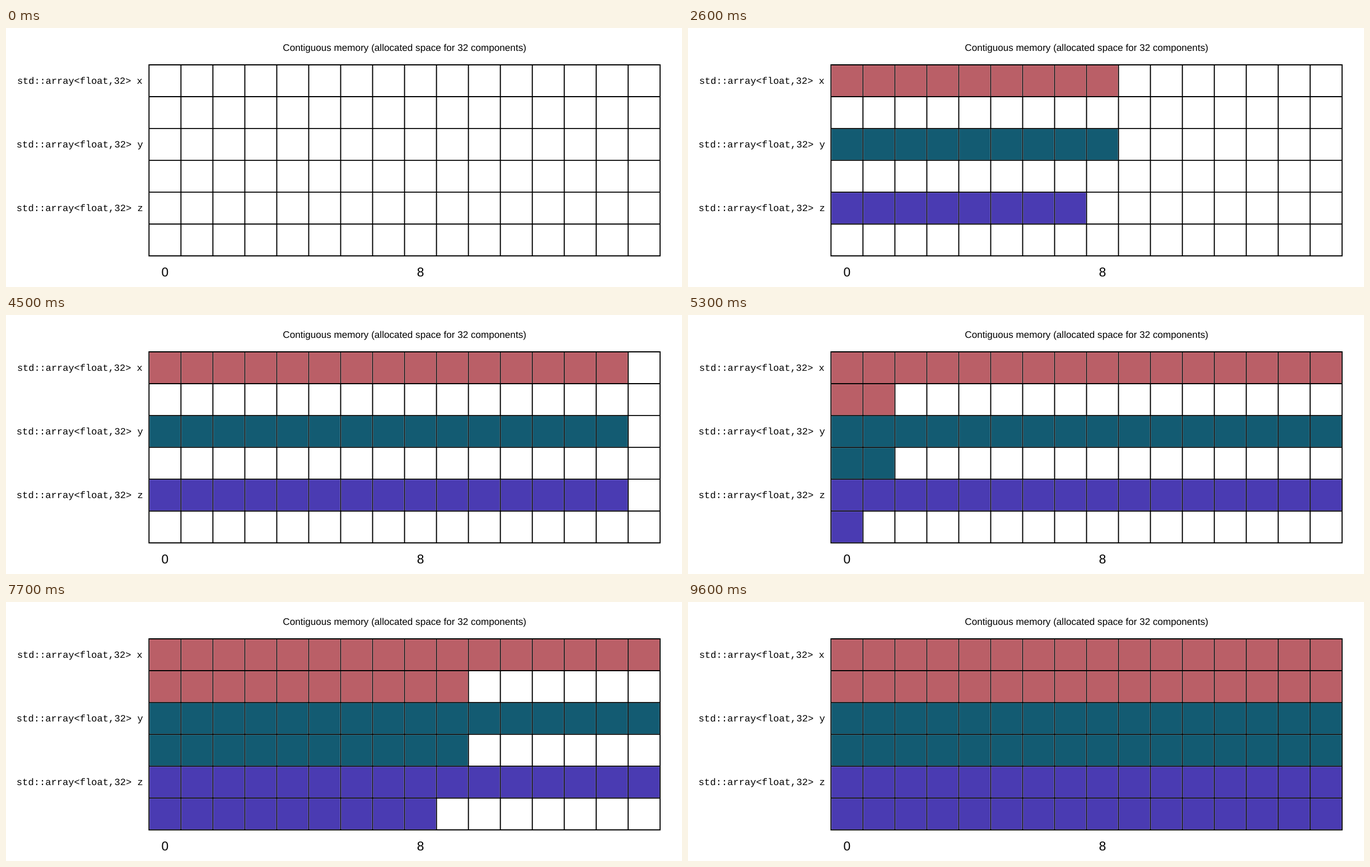
Animation, 1207 px wide and 464 px high, one loop 9700 ms. Source, as an HTML page:

```html
<!DOCTYPE html>
<html lang="en">
<head>
<meta charset="utf-8">
<title>Contiguous memory</title>
<style>
  html, body { margin: 0; width: 100%; height: 100%; overflow: hidden; background: #fff; }
  svg { display: block; width: 1207px; height: 464px; }
  text { text-anchor: middle; text-rendering: geometricPrecision; font-family: "Liberation Sans", Arial, sans-serif; }
  .code { font-family: "Liberation Mono", "Courier New", monospace; }
</style>
</head>
<body>
<svg viewBox="0 0 1207 464" xmlns="http://www.w3.org/2000/svg"></svg>
<script>
const STEP = 100, COLS = 16, ROWS = 6, SIZE = 57.03, LEFT = 255.35, TOP = 66.03, INSET = 1;
const ARRAYS = [
  { name: 'x', color: '#ba5f67', font: 16.97, baseline: 99.9 },
  { name: 'y', color: '#135b72', font: 17.11, baseline: 214 },
  { name: 'z', color: '#4a3bb2', font: 17.11, baseline: 328.4 }
];
const TOTAL = ARRAYS.length * COLS * 2;
const svg = document.querySelector('svg');

function add(tag, attrs, content = '') {
  const node = document.createElementNS(svg.namespaceURI, tag);
  for (const key in attrs) node.setAttribute(key, attrs[key]);
  node.textContent = content;
  return svg.appendChild(node);
}

function label(content, x, y, size, className = '') {
  add('text', { x, y, 'font-size': size, class: className }, content);
}

const colX = i => LEFT + i * SIZE;
const rowY = i => TOP + i * SIZE;

// Grid lines
let path = '';
for (let c = 0; c <= COLS; c++) path += `M${colX(c)} ${rowY(0)}V${rowY(ROWS)}`;
for (let r = 0; r <= ROWS; r++) path += `M${colX(0)} ${rowY(r)}H${colX(COLS)}`;
add('path', { d: path, stroke: '#000', 'stroke-width': 1.9, 'stroke-linecap': 'square', fill: 'none' });

// Cells in fill order: one component of x, y, z in turn
const cells = Array.from({ length: TOTAL }, (_, k) => {
  const array = k % ARRAYS.length;
  const index = Math.floor(k / ARRAYS.length);
  return add('rect', {
    x: colX(index % COLS) + INSET,
    y: rowY(array * 2 + Math.floor(index / COLS)) + INSET,
    width: SIZE - 2 * INSET,
    height: SIZE - 2 * INSET,
    fill: ARRAYS[array].color,
    visibility: 'hidden'
  });
});

label('Contiguous memory (allocated space for 32 components)', 711.6, 40.9, 17.11);
for (const a of ARRAYS) label(`std::array<float,32> ${a.name}`, 131.8, a.baseline, a.font, 'code');
for (const i of [0, 8]) label(i, colX(i + 0.5), 444.6, 22.81);

function render(time) {
  const filled = Math.floor(time / STEP) % (TOTAL + 1);
  cells.forEach((cell, k) => cell.setAttribute('visibility', k < filled ? 'visible' : 'hidden'));
}

const start = performance.now();
function tick() {
  render(performance.now() - start);
  requestAnimationFrame(tick);
}
tick();
</script>
</body>
</html>
```
